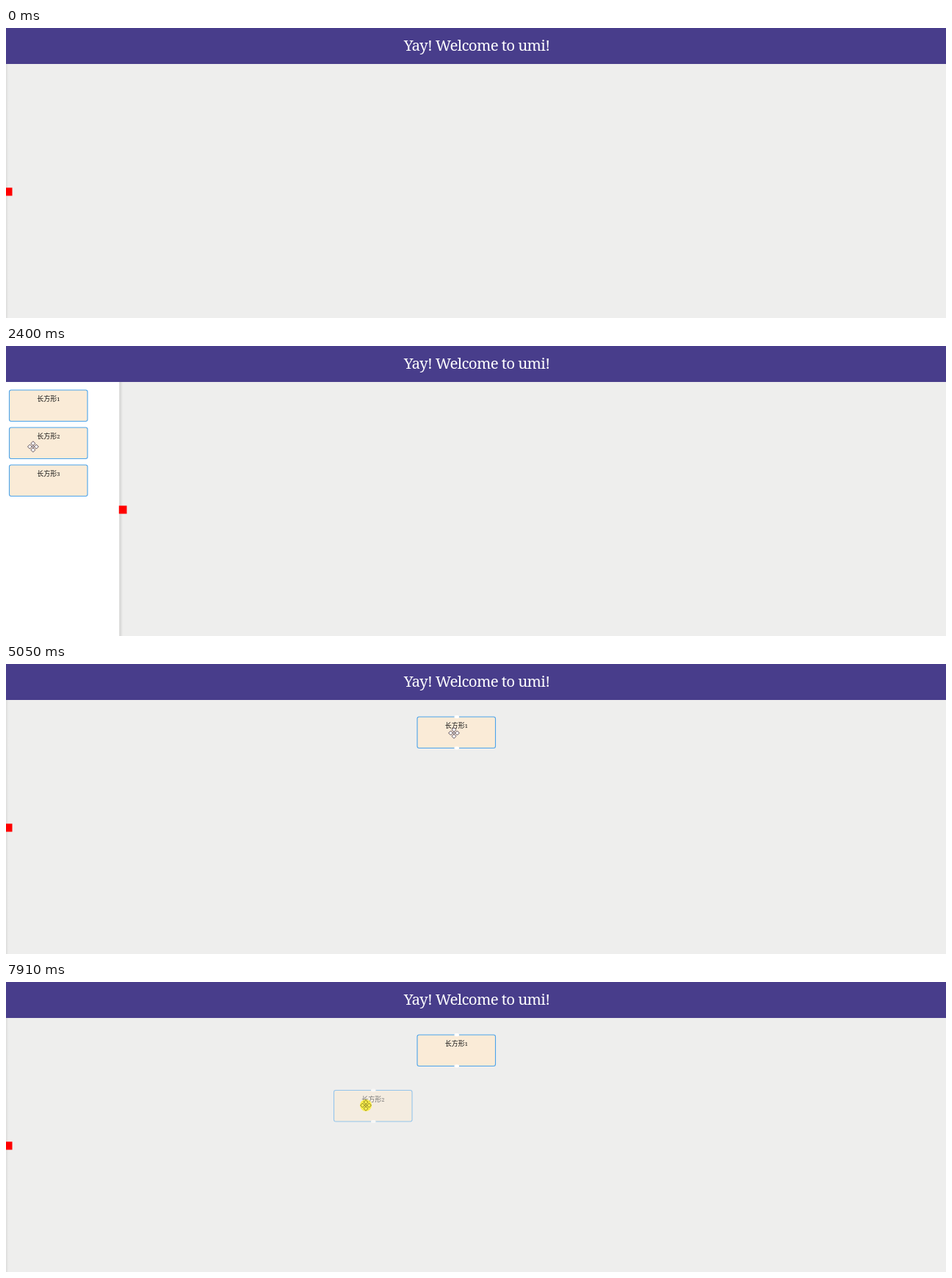
Animation of 1280x395 px, one loop 7990 ms. Source, as an HTML page:

```html
<!DOCTYPE html>
<html lang="zh">
<head>
<meta charset="utf-8">
<title>Drag from drawer</title>
<style>
html, body { margin: 0; width: 100%; height: 100%; overflow: hidden; background: #eeeeed; }
svg { display: block; width: 1280px; height: 395px; }
.title { font: 20.5px "Noto Serif", Georgia, serif; letter-spacing: -.65px; fill: #fff; text-anchor: middle; }
.label { font: 9px "Noto Sans CJK SC", "Noto Sans CJK", sans-serif; fill: #111; text-anchor: middle; }
.digit { font: 7.4px "Noto Serif", Georgia, serif; }
.box { fill: #faebd7; stroke: #4ba3ea; stroke-width: 1.1; }
.port { fill: #fff; }
.pen { fill: #fff; stroke: #4a3a48; stroke-width: .9; }
.held .pen { fill: none; stroke: #7d7620; }
</style>
</head>
<body>
<svg viewBox="0 0 1280 395">
  <defs>
    <linearGradient id="fade">
      <stop offset="0" stop-color="#000" stop-opacity=".12"/>
      <stop offset="1" stop-color="#000" stop-opacity="0"/>
    </linearGradient>
    <clipPath id="cut"><rect id="cutRect" y="48" height="347"/></clipPath>
  </defs>
  <rect width="1280" height="395" fill="#eeeeed"/>
  <g id="dropped"></g>
  <rect id="panel" y="48" height="347" fill="#fff"/>
  <rect id="shade" y="48" width="5" height="347" fill="url(#fade)"/>
  <g id="items" clip-path="url(#cut)"></g>
  <rect id="handle" y="217.5" width="10.7" height="11" fill="#f00"/>
  <rect width="1280" height="49" fill="#483d8b"/>
  <text class="title" x="641" y="31">Yay! Welcome to umi!</text>
  <g id="ghost1" opacity=".55"></g>
  <g id="ghost2" opacity=".55"></g>
  <g id="cursor">
    <circle id="halo" r="8" fill="#fff01e" fill-opacity=".75"/>
    <path id="arrow" class="pen" d="M.4 .4V11.6L2.9 9.2 4.7 13.2 6.5 12.4 4.8 8.5H8Z"/>
    <g id="move" class="pen"></g>
  </g>
</svg>
<script>
const LOOP = 7990, STEP = 77.5, LAST = 102;
const OPEN = 155, SHUT = -1.7, SLIDE = 6.45;
const ROW = 51, CARD_W = 106.5, CARD_H = 42.5;
const $ = id => document.getElementById(id);
const set = (id, attrs) => { for (const k in attrs) $(id).setAttribute(k, attrs[k]); };
const show = (id, on) => set(id, { visibility: on ? "visible" : "hidden" });
const place = (id, x, y) => set(id, { transform: `translate(${x.toFixed(2)} ${y.toFixed(2)})` });

const clamp = v => Math.min(1, Math.max(0, v));
const linear = f => f;
const smooth = f => f * f * (3 - 2 * f);
const speedUp = f => f ** 1.44;
const slowDown = f => 1 - (1 - f) ** 1.45;

// One pointer gesture: steps it spans, where it ends, easing, vertical bulge
const leg = (from, to, x, y, ease = smooth, bulge = 0) => ({ from, to, x, y, ease, bulge });
const entry = { x: 1108, y: 351 };
const legs = [
  leg(3, 4, 1095, 351),
  leg(5, 16, 101, 229, smooth, -82),
  leg(16, 23, 9, 222),
  leg(27, 34, 55, 82),
  leg(36, 47, 589, 118, slowDown, 15.8),
  leg(47, 55, 610, 94, slowDown),
  leg(65, 70.5, 6, 223),
  leg(72, 77, 86, 188),
  leg(77, 84, 47, 133),
  leg(85, 96, 468, 190, speedUp, 27.6),
  leg(96, 102, 490, 168, linear)
];
// Drawer moves: starting step, goal
const slides = [[25.13, OPEN], [36.67, SHUT], [70, OPEN], [86.45, SHUT]];
const drags = [
  { id: "ghost1", press: 35, from: 37, to: 56, dx: 51, dy: 22.5, lag: .46 },
  { id: "ghost2", press: 86, from: 86, to: Infinity, dx: 43, dy: 22, lag: .14 }
];

function card(x, y, num, ports) {
  const port = top => `<rect class="port" x="${x + 50.5}" y="${top}" width="6.5" height="4" rx="1.8"/>`;
  return `<rect class="box" x="${x}" y="${y}" width="${CARD_W}" height="${CARD_H}" rx="2.5"/>` +
    `<text class="label" x="${x + CARD_W / 2}" y="${y + 15.3}">长方形<tspan class="digit">${num}</tspan></text>` +
    (ports ? port(y - 2) + port(y + CARD_H - 2) : "");
}

const rows = [0, 1, 2].map(i => 60 + ROW * i);
$("items").innerHTML = rows.map((y, i) => card(4.5, y, i + 1)).join("");
$("dropped").innerHTML = card(560, 72, 1, true);
$("ghost1").innerHTML = card(0, 0, 1, true);
$("ghost2").innerHTML = card(0, 0, 2, true);
$("move").innerHTML = [0, 90, 180, 270].map(a =>
  `<path transform="rotate(${a})" d="M0-7.4 3-4.4 0-1.6-3-4.4Z"/>`).join("") +
  `<path d="M0-1.6 1.6 0 0 1.6-1.6 0Z"/>`;

function pointer(n) {
  let { x, y } = entry;
  for (const l of legs) {
    if (n <= l.from) break;
    const e = l.ease(clamp((n - l.from) / (l.to - l.from)));
    x += (l.x - x) * e;
    y += (l.y - y) * e + l.bulge * 4 * e * (1 - e);
  }
  return [x, y];
}

// cubic-bezier(.25, .1, .25, 1)
function cssEase(x) {
  let lo = 0, hi = 1;
  for (let i = 0; i < 20; i++) {
    const s = (lo + hi) / 2;
    if (.75 * s * (1 - s) + s ** 3 < x) lo = s; else hi = s;
  }
  return .3 * lo * (1 - lo) ** 2 + 3 * lo * lo * (1 - lo) + lo ** 3;
}

function drawerEdge(n) {
  return slides.reduce((w, [start, goal]) => w + (goal - w) * cssEase(clamp((n - start) / SLIDE)), SHUT);
}

function draw(t) {
  const n = Math.min(LAST, Math.floor((t + 16) / STEP));
  const edge = drawerEdge(n);
  const [x, y] = pointer(n);

  set("panel", { width: Math.max(0, edge) });
  set("shade", { x: edge });
  set("cutRect", { width: Math.max(0, edge + 5) });
  set("handle", { x: edge - .5 });

  for (const d of drags) {
    const [gx, gy] = pointer(n - d.lag);
    place(d.id, Math.round(gx - d.dx) + .5, Math.round(gy - d.dy) + .5);
    show(d.id, n >= d.from && n < d.to);
  }
  const dropped = n >= drags[0].to;
  show("dropped", dropped);

  const hits = (left, top, right) => x > left && x < right && y > top && y < top + CARD_H;
  const held = drags.some(d => n >= d.press && n < d.to);
  const moving = held || dropped && hits(560, 72, 666) ||
    rows.some(top => hits(4, top, Math.min(111, edge + 5)));
  place("cursor", x, y);
  set("cursor", { display: n < legs[0].from ? "none" : "inline", class: held ? "held" : "" });
  show("halo", held);
  show("move", moving);
  show("arrow", !moving);
}

const begin = performance.now();
function tick() {
  draw((performance.now() - begin) % LOOP);
  requestAnimationFrame(tick);
}
tick();
</script>
</body>
</html>
```
